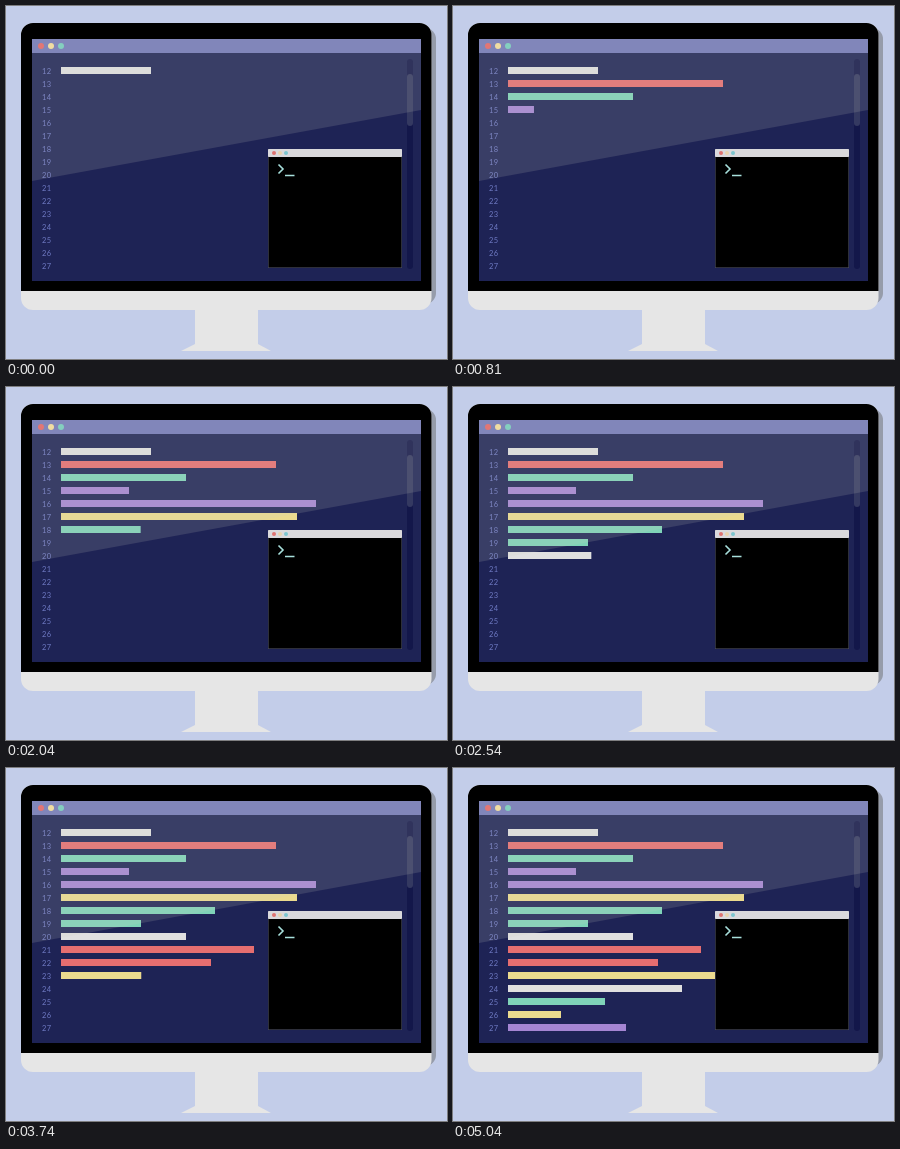
Recreate the animation shown at these times as an HTML page. Size 441 by 353 pixels, loop 5140 ms.

```html
<!DOCTYPE html>
<html lang="en">
<head>
<meta charset="utf-8">
<title>Code on a screen</title>
<style>
  html, body { margin: 0; width: 100%; height: 100%; overflow: hidden; background: #c3cde9; }
  svg { display: block; width: 441px; height: 353px; }
  text { font: 7.5px Lato, sans-serif; letter-spacing: .4px; fill: #6f7ac4; text-anchor: end; }
</style>
</head>
<body>
<svg viewBox="0 0 441 353">
  <!-- monitor -->
  <rect x="24" y="22" width="406" height="276" rx="11" fill="#969caa"/>
  <rect x="15" y="17" width="410.5" height="287" rx="12" fill="#e6e6e6"/>
  <path d="M15 285V29a12 12 0 0 1 12-12H413.5a12 12 0 0 1 12 12V285z"/>
  <path d="M189 304H252V338L265 345H175L189 338z" fill="#e6e6e6"/>

  <!-- editor -->
  <rect x="26" y="33" width="389" height="242" fill="#1e2355"/>
  <rect x="401" y="53" width="6" height="210" rx="3" fill="#13174a"/>
  <rect x="401" y="68" width="6" height="52" rx="3" fill="#343961"/>
  <g id="numbers"></g>
  <g id="bars"></g>
  <path d="M26 47H415V104L26 175z" fill="#c8c8be" fill-opacity=".155"/>
  <rect x="26" y="33" width="389" height="14" fill="#8186ba"/>
  <circle cx="35" cy="40" r="3" fill="#e27674"/>
  <circle cx="45" cy="40" r="3" fill="#f0dda2"/>
  <circle cx="55" cy="40" r="3" fill="#84cfbf"/>

  <!-- terminal -->
  <rect x="262.25" y="143.25" width="133.5" height="118.5" stroke="#55565f" stroke-width=".5"/>
  <rect x="262" y="143" width="134" height="8" rx=".8" fill="#dad9dc"/>
  <circle cx="268" cy="147" r="2" fill="#de7371"/>
  <circle cx="274" cy="147" r="2" fill="#e9d3ac"/>
  <circle cx="280" cy="147" r="2" fill="#7cc6cf"/>
  <path d="M272.5 158.5L277 163L272.5 167.5M279 169.5H288.5" fill="none" stroke="#a8e0dc" stroke-width="1.6"/>
</svg>
<script>
const LOOP = 5140, END = 5040, FIRST = 12;
const WHITE = '#e0e0e0', RED = '#e66e70', GREEN = '#7fd3b8', PURPLE = '#a585d3', YELLOW = '#ebda8e';

// start time (ms), full width, colour
const lines = [
  [-1, 90, WHITE], [0, 215, RED], [500, 125, GREEN], [742, 68, PURPLE],
  [920, 255, PURPLE], [1345, 236, YELLOW], [1890, 154, GREEN], [2180, 80, GREEN],
  [2340, 125, WHITE], [2640, 193, RED], [3110, 150, RED], [3550, 207, YELLOW],
  [4040, 174, WHITE], [4440, 97, GREEN], [4640, 53, YELLOW], [4765, 118, PURPLE]
];

// the picture advances in steps: [from, step length]
const cadence = [[0, 50], [450, 60], [1110, 50], [1360, 60], [1840, 100]];

function add(parent, tag, attrs) {
  const node = document.createElementNS('http://www.w3.org/2000/svg', tag);
  for (const key in attrs) node.setAttribute(key, attrs[key]);
  return document.getElementById(parent).appendChild(node);
}

const bars = lines.map(([, , fill], i) => {
  const y = 61 + 13 * i;
  add('numbers', 'text', { x: 45.5, y: y + 6.8 }).textContent = FIRST + i;
  return add('bars', 'rect', { x: 55, y, width: 0, height: 7, fill });
});

function quantize(t) {
  const [from, step] = cadence.findLast(([start]) => t >= start);
  return from + Math.floor((t - from) / step) * step;
}

function draw(t) {
  const now = quantize(t);
  lines.forEach(([start, width], i) => {
    const end = i + 1 < lines.length ? lines[i + 1][0] : END;
    const progress = Math.min(1, Math.max(0, (now - start) / (end - start)));
    bars[i].setAttribute('width', width * progress);
  });
}

const origin = performance.now();
function tick() {
  draw((performance.now() - origin) % LOOP);
  requestAnimationFrame(tick);
}
tick();
</script>
</body>
</html>
```
